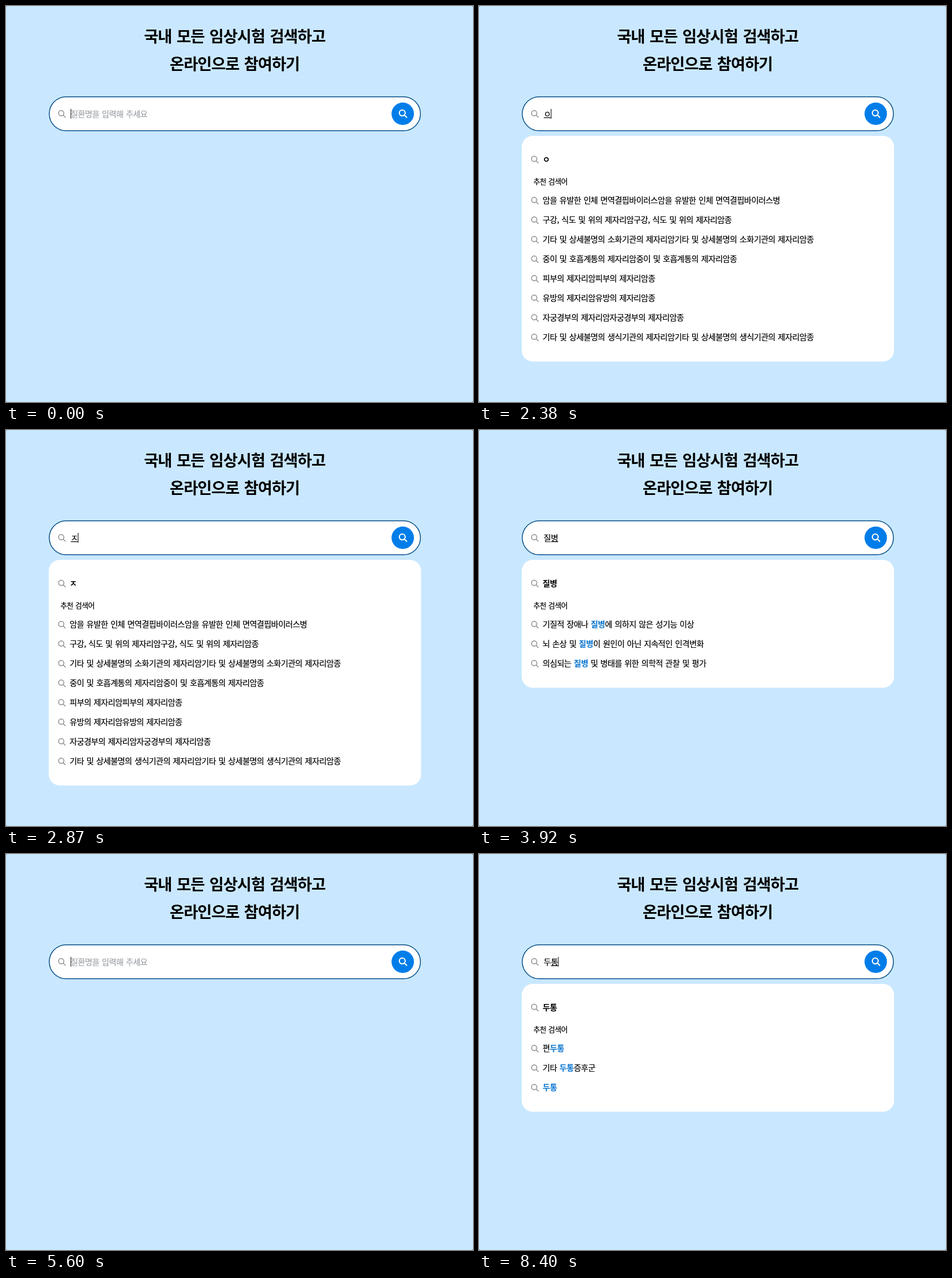
An HTML page that plays this animation: 813x689 px, repeating every 8.47 s.

```html
<!DOCTYPE html>
<html lang="ko">
<head>
<meta charset="utf-8">
<style>
  html, body { margin: 0; width: 100%; height: 100%; overflow: hidden; background: #c9e8ff; }
  svg { display: block; width: 813px; height: 689px; }
  text {
    font: 500 14.15px "Noto Sans CJK KR", "Noto Sans CJK", "Noto Sans KR", sans-serif;
    letter-spacing: -.038em; word-spacing: .071em; white-space: pre;
    stroke: #000; stroke-width: .2;
  }
  .title { font-size: 27.4px; font-weight: 600; text-anchor: middle; stroke: none; }
  .label { font-size: 12.6px; }
  .hint { fill: #9a9fa5; stroke: #9a9fa5; }
  .bold { font-weight: 700; stroke: none; }
  .match { font-weight: 700; fill: #0b76d0; stroke: none; }
  .lens { fill: none; stroke: #999; stroke-width: 1.7; stroke-linecap: round; }
</style>
</head>
<body>
<svg viewBox="0 0 813 689">
  <defs>
    <path id="lens" d="M-5.3 -1a4.6 4.6 0 1 0 9.2 0a4.6 4.6 0 1 0 -9.2 0M2.7 2.4L6.3 6"/>
  </defs>
  <rect width="813" height="689" fill="#456"/>
  <rect width="813" height="689" rx="2" fill="#c9e8ff"/>
  <text class="title" x="398" y="62.5">국내 모든 임상시험 검색하고</text>
  <text class="title" x="398" y="111">온라인으로 참여하기</text>

  <rect x="75.3" y="157.9" width="646.2" height="59.2" rx="29.6" fill="#fff" stroke="#075089" stroke-width="1.5"/>
  <use href="#lens" class="lens" x="96.8" y="187.5"/>
  <circle cx="690.7" cy="187.5" r="19.5" fill="#007de9"/>
  <use href="#lens" class="lens" style="stroke:#fff;stroke-width:1.9" transform="translate(690.6 187.2) scale(1.1)"/>
  <text id="hint" class="hint" x="112.5" y="192.5">질환명을 입력해 주세요</text>
  <text id="typed" x="112.5" y="192.5"></text>
  <rect id="underline" y="193.8" height="1.2"/>
  <rect id="caret" y="179" width="1" height="17"/>

  <g id="panel">
    <rect id="sheet" x="74.5" y="226" width="648" rx="19" fill="#fff"/>
    <use href="#lens" class="lens" x="96.8" y="267"/>
    <text id="query" class="bold" x="110.7" y="271.5"></text>
    <text class="label" x="94.7" y="310.2">추천 검색어</text>
    <g id="rows"></g>
  </g>
</svg>
<script>
const LOOP = 8470, TICK = 70, BLINK = 525, PITCH = 12.5, LEFT = 112.5;
const $ = id => document.getElementById(id);

const cancer = [
  '암을 유발한 인체 면역결핍바이러스병',
  '구강, 식도 및 위의 제자리암종',
  '기타 및 상세불명의 소화기관의 제자리암종',
  '중이 및 호흡계통의 제자리암종',
  '피부의 제자리암종',
  '유방의 제자리암종',
  '자궁경부의 제자리암종',
  '기타 및 상세불명의 생식기관의 제자리암종'
];
const disease = [
  '기질적 장애나 질병에 의하지 않은 성기능 이상',
  '뇌 손상 및 질병이 원인이 아닌 지속적인 인격변화',
  '의심되는 질병 및 병태를 위한 의학적 관찰 및 평가'
];
const headache = ['편두통', '기타 두통증후군', '두통'];

const keys = [
  [0, ''], [140, 'ㅇ'], [350, '아'], [560, '암'],
  [2100, '아'], [2240, 'ㅇ'], [2590, ''],
  [2870, 'ㅈ'], [2940, '지'], [3080, '질'],
  [3150, '질ㅂ'], [3290, '질벼'], [3360, '질병'],
  [5040, '질벼'], [5180, '질ㅂ'], [5320, '질'], [5460, ''],
  [5880, 'ㄷ'], [5950, '두'], [6090, '둩'], [6160, '두토'], [6300, '두통']
];
const results = [[0, []], [1050, cancer], [3920, disease], [6860, headache]];

const latest = (track, t) => track.filter(([start]) => start <= t).pop();

// A missing match gives index -1, so the label repeats itself.
function highlight(text, query) {
  const at = text.indexOf(query), end = at + query.length;
  return text.slice(0, at) +
    `<tspan class="match">${text.slice(at, end)}</tspan>` + text.slice(end);
}

function rowMarkup(text, i, query) {
  const y = 338.5 + 34 * i;
  return `<use href="#lens" class="lens" x="96.8" y="${y}"/>` +
    `<text x="110.7" y="${y + 4.5}">${highlight(text, query)}</text>`;
}

const show = (id, on) => $(id).setAttribute('visibility', on ? 'visible' : 'hidden');

let shown = '';
function drawSearch(query, list) {
  const state = query + '|' + list[0];
  if (state === shown) return;
  shown = state;
  const end = LEFT + PITCH * query.length;
  $('typed').textContent = $('query').textContent = query;
  $('caret').setAttribute('x', end);
  $('underline').setAttribute('x', end - PITCH + .3);
  $('underline').setAttribute('width', PITCH);
  show('underline', query);
  show('hint', !query);
  show('panel', query && list.length);
  $('sheet').setAttribute('height', 120.5 + 34 * list.length);
  $('rows').innerHTML = query ? list.map((text, i) => rowMarkup(text, i, query)).join('') : '';
}

function render(ms) {
  const t = Math.floor(ms % LOOP / TICK) * TICK;
  const [pressed, query] = latest(keys, t);
  drawSearch(query, latest(results, t)[1]);
  show('caret', Math.floor((t - pressed) / BLINK) % 2 === 0);
}

const start = performance.now();
function frame() {
  render(performance.now() - start);
  requestAnimationFrame(frame);
}
frame();
</script>
</body>
</html>
```
